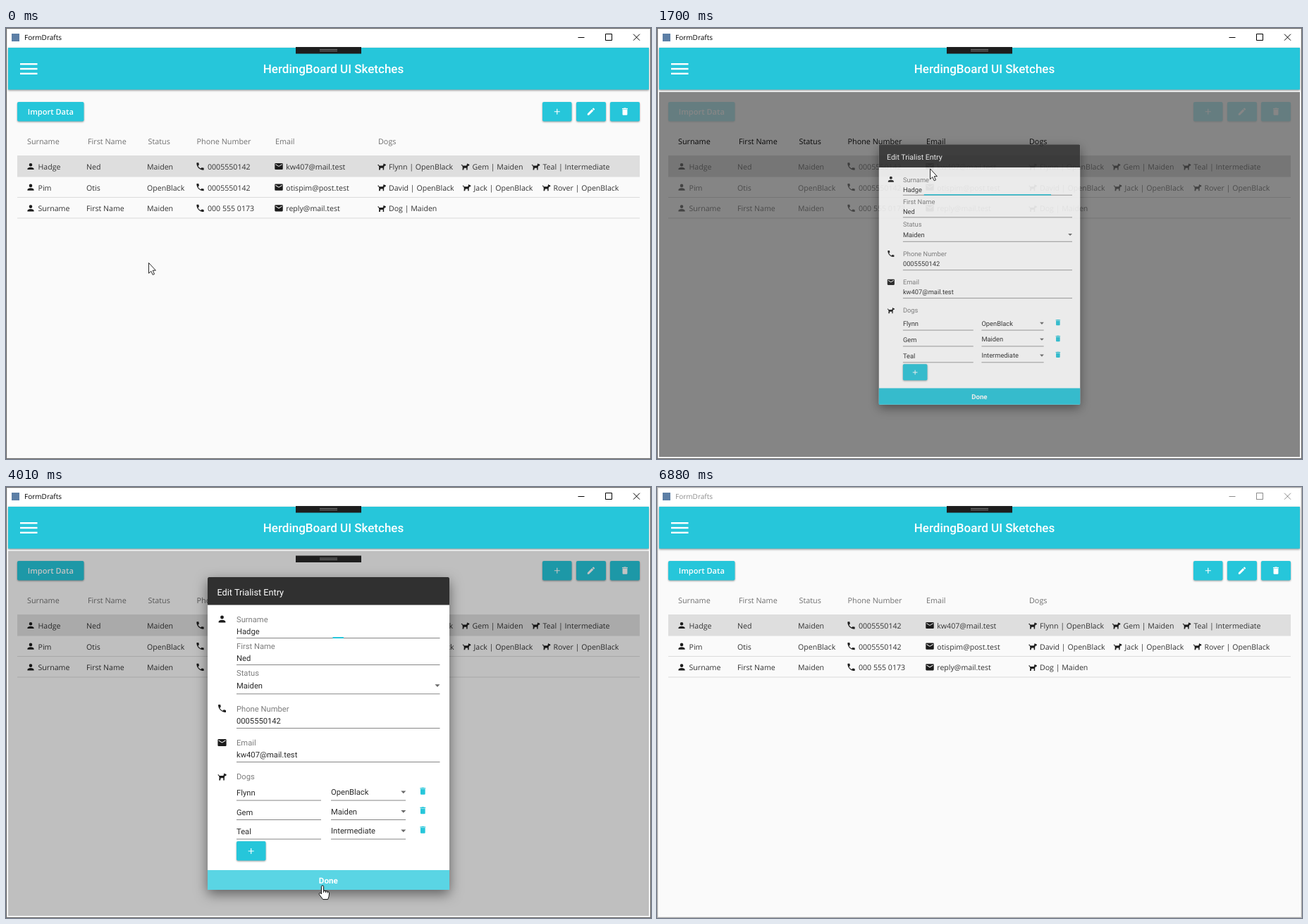
Recreate the animation shown at these times as an HTML page. Size 915x612 px, loop 6960 ms.

```html
<!DOCTYPE html>
<html lang="en">
<head>
<meta charset="utf-8">
<title>FormDrafts</title>
<style>
html, body { margin: 0; width: 100%; height: 100%; overflow: hidden; background: #fff; }
svg { display: block; width: 100%; height: 100%; }
text { text-rendering: geometricPrecision; white-space: pre; }
.seg { font: 10.6px "Open Sans", "Noto Sans", sans-serif; fill: #333; }
.head { font: 500 10.8px "Open Sans", "Noto Sans", sans-serif; fill: #707070; }
.rob { font: 11.2px Roboto, sans-serif; fill: #2b2b2b; }
.lab { font: 11.2px Roboto, sans-serif; fill: #7d7d7d; }
.raised { filter: drop-shadow(0 1px 1px rgba(0,0,0,.38)); }
.deep { filter: drop-shadow(0 6px 9px rgba(0,0,0,.5)); }
</style>
</head>
<body>
<svg id="stage" viewBox="0 0 915 612" xmlns="http://www.w3.org/2000/svg"></svg>
<script>
const LOOP = 6960, CYAN = '#26c6da';
const $ = id => document.getElementById(id);

const ICONS = {
  person: 'M12 4a4 4 0 0 1 0 8 4 4 0 0 1 0-8m0 10c4.42 0 8 1.79 8 4v2H4v-2c0-2.21 3.58-4 8-4z',
  mail: 'M20 8l-8 5-8-5V6l8 5 8-5m0-2H4c-1.11 0-2 .89-2 2v12a2 2 0 0 0 2 2h16a2 2 0 0 0 2-2V6c0-1.11-.9-2-2-2z',
  phone: 'M6.62 10.79c1.44 2.83 3.76 5.14 6.59 6.59l2.2-2.2c.27-.27.67-.36 1.02-.24 1.12.37 2.33.57 3.57.57a1 1 0 0 1 1 1V20a1 1 0 0 1-1 1C10.61 21 3 13.39 3 4a1 1 0 0 1 1-1h3.5a1 1 0 0 1 1 1c0 1.25.2 2.45.57 3.57.11.35.03.74-.25 1.02z',
  dog: 'M1.5 7.5l2.5-1 2 3h9l2-6 1.8 2H21l1.5 2.5-2 1.8h-2l-1 4.2v6h-2.6v-5H9l-1 5H5l.6-6-1-4z',
  trash: 'M19 4h-3.5l-1-1h-5l-1 1H5v2h14M6 19a2 2 0 0 0 2 2h8a2 2 0 0 0 2-2V7H6z',
  plus: 'M19 13h-6v6h-2v-6H5v-2h6V5h2v6h6z',
  pencil: 'M20.71 7.04c.39-.39.39-1.04 0-1.41l-2.34-2.34c-.37-.39-1.02-.39-1.41 0l-1.84 1.83 3.75 3.75M3 17.25V21h3.75L17.81 9.93l-3.75-3.75z'
};

const rect = (x, y, w, h, fill, more = '') =>
  `<rect x="${x}" y="${y}" width="${w}" height="${h}" fill="${fill}" ${more}/>`;
const text = (x, y, s, cls = 'seg', more = '') =>
  `<text x="${x}" y="${y}" class="${cls}" ${more}>${s}</text>`;
const icon = (name, cx, cy, fill = '#1c1c1c', k = .573) =>
  `<path d="${ICONS[name]}" fill="${fill}" transform="translate(${cx - 12 * k} ${cy - 12 * k}) scale(${k})"/>`;
const button = (x, y, w, inner) =>
  `<g class="raised">${rect(x, y, w, 27.5, CYAN, 'rx="2"')}</g>${inner}`;
const grip = y => rect(411, y, 93, 9.5, '#1e1e1e') +
  rect(445, y + 3, 25, 1, '#777') + rect(445, y + 5.2, 25, 1, '#777');

const PHONE = '0005550142', MAIL = 'kw407@mail.test';
const PEOPLE = [
  ['Hadge', 'Ned', 'Maiden', PHONE, MAIL,
    [[527, 'Flynn | OpenBlack'], [645.5, 'Gem | Maiden'], [745.5, 'Teal | Intermediate']]],
  ['Pim', 'Otis', 'OpenBlack', PHONE, 'otispim@post.test',
    [[527, 'David | OpenBlack'], [647.5, 'Jack | OpenBlack'], [760.5, 'Rover | OpenBlack']]],
  ['Surname', 'First Name', 'Maiden', '000 555 0173', 'reply@mail.test',
    [[527, 'Dog | Maiden']]]
];

function tableRow([sur, first, status, phone, mail, dogs], i) {
  const y = 197 + i * 29.7, b = y + 4;
  return icon('person', 35, y - .5) + text(45.5, b, sur) + text(114, b, first) +
    text(200, b, status) + icon('phone', 275.5, y - .5) + text(286, b, phone) +
    icon('mail', 387, y - .5) + text(397.3, b, mail) +
    dogs.map(([x, s]) => icon('dog', x + 6, y) + text(x + 16, b, s)).join('');
}

const HEADS = [[30, 'Surname'], [116, 'First Name'], [201.5, 'Status'],
  [270.5, 'Phone Number'], [382, 'Email'], [528, 'Dogs']];

const windowBar = () =>
  rect(0, 0, 915, 612, '#fff') +
  rect(8, 8, 11, 11, '#5d7fa6') +
  `<g id="caption">${text(26, 17, 'FormDrafts', 'seg', 'style="font-size:10px;fill:#000"')}
   <path d="M811.5 13.5h9M850.5 8.5h9v9h-9zM890 8.7l9 9M899 8.7l-9 9" fill="none" stroke="#000"/></g>`;

const page = () =>
  rect(3, 28, 909, 581, '#fafafa') +
  `<g id="tools">` +
  button(16, 105, 94.5, text(63.3, 123, 'Import Data', 'seg',
    'text-anchor="middle" style="font-size:11.1px;font-weight:600;fill:#fff"')) +
  button(761, 105, 41.5, icon('plus', 781.8, 118.7, '#fff')) +
  button(809, 105, 42, icon('pencil', 830, 118.7, '#fff')) +
  button(857, 105, 42, icon('trash', 878, 118.7, '#fff')) + `</g>` +
  `<g id="heads">${HEADS.map(([x, s]) => text(x, 165, s, 'head', 'style="fill:inherit"')).join('')}</g>` +
  rect(16, 181, 883, 30.5, '#dedede') +
  rect(16, 240, 883, 1, '#dcdcdc') + rect(16, 269.5, 883, 1, '#dcdcdc') +
  rect(16, 211, 883, 30, '#dadada', 'id="hover1"') +
  rect(16, 241, 883, 29.5, '#dadada', 'id="hover2"') +
  `<g id="cells">${PEOPLE.map(tableRow).join('')}</g>` +
  rect(3, 91, 909, 518, '#000', 'id="shade"');

const banner = () =>
  `<g style="filter:drop-shadow(0 1px 1.5px rgba(0,0,0,.45))">${rect(3, 28, 909, 59.5, CYAN)}</g>` +
  [50, 56.8, 63.6].map(y => rect(20, y, 24.5, 2.4, '#fff')).join('') +
  text(464.5, 64.3, 'HerdingBoard UI Sketches', 'rob',
    'text-anchor="middle" style="font-size:17px;font-weight:500;fill:#fff"') +
  grip(27);

const line = (x, y, w) => rect(x, y, w, 1, '#868686');
const drop = (x, y) => `<path d="M${x} ${y}h7l-3.5 3.7z" fill="#6a6a6a"/>`;

function dialog() {
  const fields = [
    ['Surname', 192, 'Hadge', 209, 214], ['First Name', 230, 'Ned', 246.7, 252],
    ['Status', 268, 'Maiden', 286, 293.3], ['Phone Number', 318.7, PHONE, 335.7, 342],
    ['Email', 367, MAIL, 384, 390]];
  const dogs = [['Flynn', 'OpenBlack'], ['Gem', 'Maiden'], ['Teal', 'Intermediate']];
  return `<g class="deep">${rect(286, 128, 343, 444, '#fff', 'rx="2"')}</g>` +
    `<path d="M286 167.5V130q0-2 2-2h339q2 0 2 2v37.5z" fill="#303030"/>` +
    text(299.5, 153.7, 'Edit Trialist Entry', 'rob', 'style="font-size:12.7px;fill:#fff"') +
    [['person', 187.5], ['phone', 314.5], ['mail', 363], ['dog', 411.5]]
      .map(([n, y]) => icon(n, 306.5, y, '#1c1c1c', .61)).join('') +
    fields.map(([l, ly, v, vy, uy]) =>
      text(327, ly, l, 'lab') + text(327, vy, v, 'rob') + line(327, uy, 288.5)).join('') +
    drop(608.5, 280.3) + text(327, 415, 'Dogs', 'lab') +
    dogs.map(([name, grade], i) => {
      const y = 437.5 + i * 27.5;
      return text(327, y + .5, name, 'rob') + line(327, y + 7, 120) +
        text(461, y - .3, grade, 'rob') + line(461, y + 7, 106) + drop(560.3, y - 6) +
        icon('trash', 591.3, y - 5.7, CYAN, .56);
    }).join('') +
    button(327, 503, 41.5, icon('plus', 347.7, 517, '#fff')) +
    rect(286, 544, 343, 28, CYAN, 'id="done"') +
    text(457.3, 563, 'Done', 'rob', 'text-anchor="middle" style="font-size:11.6px;font-weight:700;fill:#fff"') +
    rect(327, 213, 288.5, 2, CYAN, 'id="focus"') +
    rect(327, 198.5, 1, 12.5, '#111', 'id="caret"');
}

const pointers = () =>
  `<g id="arrow"><path d="M.5.5V15.3L3.8 12.2 6.2 17.4 8.5 16.4 6.2 11.2H10.4z" fill="#fff" stroke="#111" stroke-width=".9"/></g>
   <g id="beam" fill="none" stroke="#111"><path d="M-2.5-7.5h1.7l.8.8.8-.8h1.7M0-7V7M-2.5 7.5h1.7l.8-.8.8.8h1.7M-1.5 2h3"/></g>
   <g id="hand"><path d="M-1.6 1.5a1.6 1.6 0 0 1 3.2 0V7l5.8 1.3q2.2.6 2.2 2.7l-.6 4.6-1.4 4H.6L-4.6 12.6q-.7-2 1-2.3 1 0 2 1.7zM1.6 7v3M4.4 7.7v2.5M7 8.3v2.4" fill="#fff" stroke="#111"/></g>`;

$('stage').innerHTML = windowBar() + page() + banner() +
  `<g id="grip2">${grip(97.5)}</g><g id="dialog">${dialog()}</g>` +
  `<rect x="1.5" y="1.5" width="912" height="609" fill="none" stroke="#e4e4e4"/>
   <rect id="frame" x=".5" y=".5" width="914" height="611" fill="none"/>` + pointers();

// Pointer waypoints: time, x, y
const PATH = [
  [370, 202, 333], [560, 232, 314], [780, 305, 262], [1010, 373, 210.5], [1060, 382, 202],
  [1140, 387, 199], [2440, 387, 200], [2600, 388, 248], [2780, 388, 331], [2940, 414, 458],
  [3090, 441, 561], [3300, 442, 571], [3550, 449, 566], [5400, 449, 566],
  [5560, 392, 536], [5800, 206, 446], [6040, 1, 350]];

function pointerAt(t) {
  let a = PATH[0];
  for (const b of PATH) {
    if (t < b[0]) {
      const k = Math.max(0, (t - a[0]) / (b[0] - a[0] || 1));
      return [a[1] + (b[1] - a[1]) * k, a[2] + (b[2] - a[2]) * k];
    }
    a = b;
  }
  return [a[1], a[2]];
}

const clamp = v => Math.min(1, Math.max(0, v));
const ramp = (t, from, len) => clamp((t - from) / len);
const set = (id, attrs) => { for (const k in attrs) $(id).setAttribute(k, attrs[k]); };
const show = (id, on) => set(id, { visibility: on ? 'visible' : 'hidden' });

const OPEN = 1447, CLOSE = 3836, GONE = 4150;
const FIELDS = [[196, 214], [235, 252], [324, 342], [372, 390], [425, 445], [453, 472], [481, 500]];

function draw(t) {
  const [x, y] = pointerAt(t);
  const busy = t >= OPEN && t < CLOSE;
  const modal = t >= OPEN && t < GONE;
  const grow = ramp(t, OPEN, 304);
  const live = t < 6880;

  set('caption', { opacity: live ? 1 : .45 });
  set('frame', { stroke: live ? '#6b6b6b' : '#a8a8a8' });
  set('tools', { opacity: busy ? .28 : 1 });
  set('cells', { opacity: busy ? .56 : 1 });
  set('heads', { fill: busy ? '#111' : '#707070' });
  show('hover1', t < OPEN && y >= 210 && y < 241);
  show('hover2', t < OPEN && y >= 241 && y < 270.5);

  set('shade', { opacity: .56 * grow * (1 - ramp(t, CLOSE, 300)) });
  show('grip2', t >= 1850 && t < GONE);
  set('dialog', {
    display: modal ? 'inline' : 'none', opacity: grow,
    transform: `translate(457.5 350) scale(${Math.max(grow, .001)}) translate(-457.5 -350)`
  });
  const lit = ramp(t, 3060, 140);
  set('done', { fill: `rgb(${38 + 52 * lit},${198 + 15 * lit},${218 + 10 * lit})` });

  const shrink = ramp(t, CLOSE, 220);
  const span = 288.5 * ramp(t, 1510, 253) * (1 - Math.sin(shrink * Math.PI / 2));
  set('focus', { x: 471.2 - span / 2, width: span });
  show('caret', modal && t >= 1750 && t < CLOSE && (t < 2160 || (t >= 2690 && t < 3220) || t >= 3750));

  let kind = 'arrow';
  if (t >= 1800 && t < GONE) {
    if (y >= 544) kind = 'hand';
    else if (FIELDS.some(([a, b]) => y >= a && y <= b)) kind = 'beam';
  }
  for (const id of ['arrow', 'beam', 'hand']) {
    show(id, id === kind && t < 6040);
    set(id, { transform: `translate(${x} ${y})` });
  }
}

let start;
function tick(now) {
  if (start === undefined) start = now;
  draw((now - start) % LOOP);
  requestAnimationFrame(tick);
}
draw(0);
requestAnimationFrame(tick);
</script>
</body>
</html>
```
